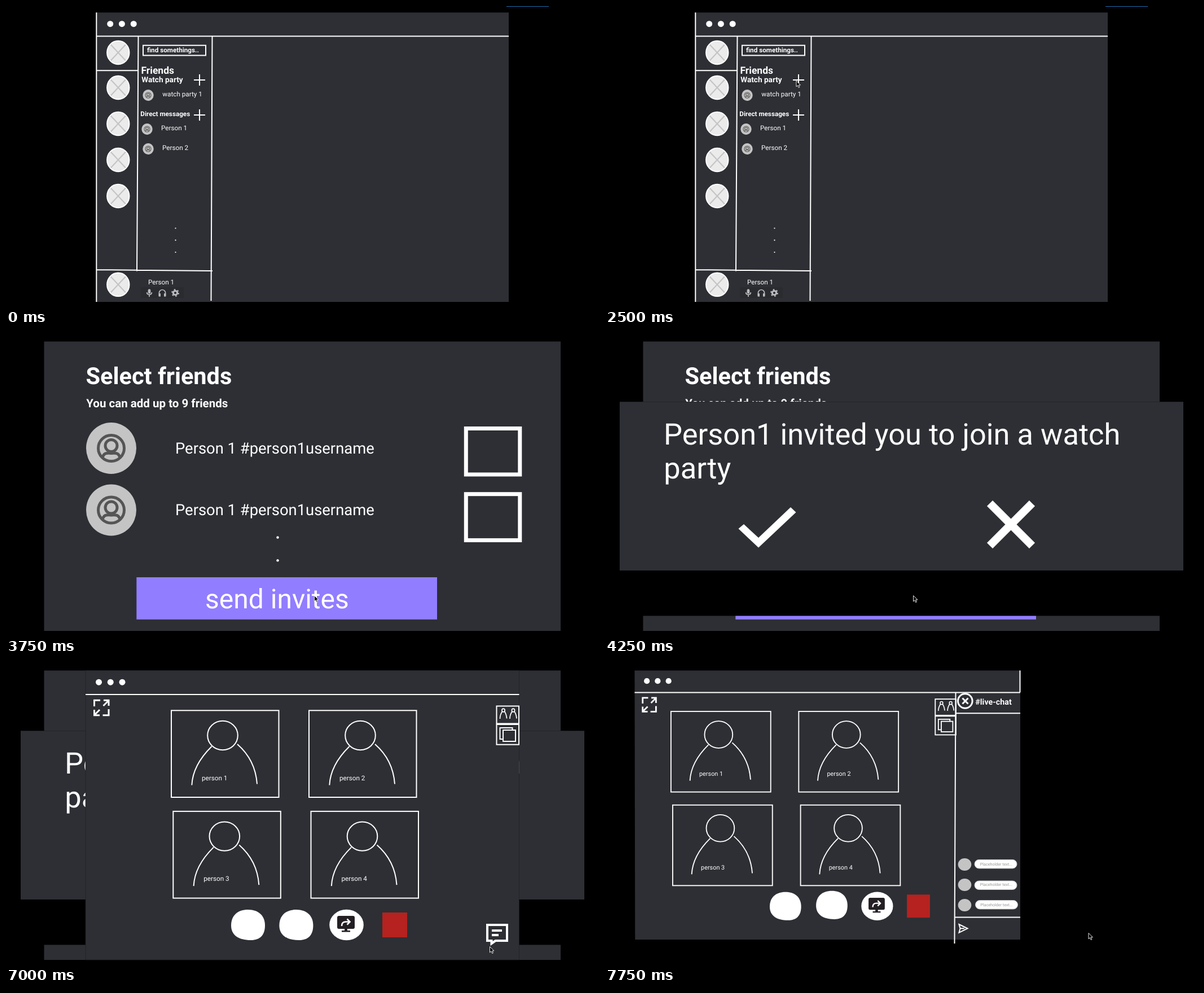
Write an HTML page that moves like this. It is 1051 px wide and 533 px high and loops after 8 s.

```html
<!DOCTYPE html>
<html lang="en">
<head>
<meta charset="utf-8">
<title>Watch party wireframe</title>
<style>
html, body { margin: 0; width: 100%; height: 100%; overflow: hidden; background: #000; }
svg { display: block; width: 1051px; height: 533px; font: 11.7px Roboto, sans-serif; text-rendering: geometricPrecision; }
text { fill: #fff; }
.bold { font-weight: 700; }
.bg { fill: #2d2f34; }
.line { fill: none; stroke: #fff; stroke-width: 2; }
.white { fill: #fff; }
.icon { fill: none; stroke: #fff; stroke-width: 3; }
.grey { fill: #c4c4c4; }
.hint { font-size: 7.2px; fill: #999; }
</style>
</head>
<body>
<svg viewBox="0 0 1051 533">
<defs>
  <g id="avatar">
    <ellipse rx="20" ry="21" fill="#ebebeb"/>
    <path d="M-14-15L14 15M14-15L-14 15" stroke="#c4c4c4" stroke-width="2"/>
    <ellipse rx="19.7" ry="20.7" class="line" stroke-width="1.6"/>
  </g>
  <g id="user">
    <ellipse rx="44.5" ry="45.5" class="grey"/>
    <g fill="none" stroke="#555" stroke-width="5">
      <circle r="23"/>
      <circle cy="-4.5" r="10.5"/>
      <path d="M-16 17C-12 6-6 9 0 9S12 6 16 17"/>
    </g>
  </g>
  <path id="plus" class="line" d="M-10 0H10M0-10V10"/>
  <g id="dots" class="white">
    <circle cx="164.5" cy="32.2" r="5.5"/><circle cx="185.2" cy="32.2" r="5.5"/><circle cx="206" cy="32.2" r="5.5"/>
  </g>
  <g id="card" class="line">
    <rect x="293" y="82.3" width="190.5" height="153.7"/>
    <ellipse cx="384" cy="126.5" rx="26.8" ry="25.7"/>
    <path d="M364.500 146Q331 179 329.300 214.500M410 142Q442 170 445 212.500"/>
  </g>
  <g id="cards">
    <use href="#card"/><use href="#card" x="244"/>
    <use href="#card" x="3.3" y="178.600"/><use href="#card" x="247.500" y="178.600"/>
    <text x="347" y="205.500">person 1</text><text x="591" y="205.500">person 2</text>
    <text x="350.300" y="384">person 3</text><text x="594.500" y="384">person 4</text>
  </g>
  <path id="expand" class="icon" d="M167 64.300H156.500V75M171.500 90.700H182V80M173 64.300H182V74M181.500 65L172.500 74M156.500 81V90.700H166M157 90L166 81"/>
  <g id="panel" class="line">
    <rect x="869.500" y="74.500" width="39.500" height="31"/>
    <rect x="869.500" y="107" width="39.500" height="35.700"/>
    <g id="mini" stroke-width="1.700">
      <ellipse cx="881.500" cy="82" rx="2.600" ry="2.800"/>
      <path d="M879.500 84Q875.500 90 875.500 97M883.500 84Q887 89 887.500 96.500"/>
    </g>
    <use href="#mini" x="17.500"/>
    <rect x="875.500" y="113" width="22" height="20"/>
    <rect x="881" y="117" width="22" height="20" class="bg"/>
  </g>
  <path id="blob" class="white" d="M399 463C399 445 411 435 429 435C448 435 459 446 459 463C459 480 450 489 434 489C412 489 399 480 399 463Z"/>
  <g id="share">
    <ellipse cx="603.500" cy="462" rx="30.300" ry="27.200" class="white"/>
    <path d="M590 446H615Q618 446 618 449V466Q618 469 615 469H605V472H610V474.500H595V472H600V469H590Q587 469 587 466V449Q587 446 590 446Z" fill="#231f23"/>
    <path d="M595 464Q595 456.500 602 456.500H608M604.500 451.500L609.500 456.500L604.500 461.500" fill="none" stroke="#fff" stroke-width="2.600"/>
  </g>
  <rect id="mark" x="667" y="440" width="44" height="44" fill="#b5221f"/>
</defs>

<g id="home">
  <path class="bg" d="M160 11.500H891V524H160Z"/>
  <path class="line" d="M160.300 11.500V524M160 53.500H891M234.500 54L232 469.500M365.500 54L363.500 522M160 114.300H234M160 467L366 469"/>
  <use href="#dots" x="20.200" y="-.500"/>
  <use href="#avatar" x="198.800" y="82.500"/><use href="#avatar" x="198.800" y="144.500"/>
  <use href="#avatar" x="198.800" y="208.500"/><use href="#avatar" x="198.800" y="272.500"/>
  <use href="#avatar" x="198.800" y="336.500"/><use href="#avatar" x="198.800" y="493.300"/>
  <rect class="line" x="243" y="69.700" width="111" height="17.800"/>
  <g class="bold">
    <text x="250" y="82.300">find somethings..</text>
    <text x="239.500" y="119.500" font-size="17.500">Friends</text>
    <text x="240.300" y="134.800" font-size="13.600">Watch party</text>
    <text x="238.300" y="195">Direct messages</text>
  </g>
  <use href="#plus" x="343" y="131"/><use href="#plus" x="343" y="193"/>
  <text x="277.300" y="160">watch party 1</text>
  <text x="275" y="220">Person 1</text>
  <text x="277" y="255">Person 2</text>
  <text x="252" y="493.200">Person 1</text>
  <use href="#user" transform="translate(252 158) scale(.218)"/>
  <use href="#user" transform="translate(250 218) scale(.218)"/>
  <use href="#user" transform="translate(252 253) scale(.218)"/>
  <g class="white"><circle cx="300.500" cy="393.500" r="1.100"/><circle cx="300.500" cy="414.700" r="1.100"/><circle cx="300.500" cy="436" r="1.100"/></g>
  <rect x="239" y="498" width="76" height="19" fill="#292b2f"/>
  <g fill="none" stroke="#b9bbbe" stroke-width="1.700">
    <rect x="252.500" y="502" width="3" height="6.500" rx="1.500" fill="#b9bbbe"/>
    <path d="M249.700 507Q249.700 511 254 511T258.300 507M254 511V515"/>
    <path d="M271.500 513V508A5.500 5.500 0 0 1 282.500 508V513"/>
    <path d="M272.300 509V514.500M281.700 509V514.500" stroke-width="3.400"/>
    <circle cx="300" cy="508" r="3.600" stroke-width="3"/>
    <circle cx="300" cy="508" r="5.800" stroke-width="2.200" stroke-dasharray="2.600 3.474"/>
  </g>
</g>

<g id="select">
  <path class="bg" d="M67.500 11.500H983V524H67.500Z"/>
  <text x="141.500" y="87" font-size="41.500" class="bold">Select friends</text>
  <text x="142.300" y="127.800" font-size="20.500" class="bold">You can add up to 9 friends</text>
  <use href="#user" x="186.500" y="200.500"/><use href="#user" x="186.500" y="310"/>
  <g font-size="27.400">
    <text x="300" y="209.700">Person 1 #person1username</text>
    <text x="300" y="319.200">Person 1 #person1username</text>
  </g>
  <g class="line" stroke-width="7" style="stroke-width:7">
    <rect x="815.300" y="165.500" width="95.500" height="81.500"/><rect x="815.300" y="281.700" width="95.500" height="81.700"/>
  </g>
  <circle cx="481.500" cy="358.500" r="2.200" class="white"/><circle cx="481.500" cy="399.300" r="2.200" class="white"/>
  <rect x="231.300" y="429" width="532.700" height="74.700" fill="#917dff"/>
  <text x="353" y="484" font-size="48">send invites</text>
</g>

<g id="invite">
  <rect x="26" y="118.300" width="999" height="379"/>
  <rect x="26" y="118.300" width="999" height="298.700" class="bg"/>
  <g font-size="52.400">
    <text x="104" y="194">Person1 invited you to join a watch</text>
    <text x="104.300" y="254">party</text>
  </g>
  <path class="white" d="M236.500 343L246 335L272 359L329 305L338.500 314L272 376.500Z"/>
  <path d="M682 298L757 373M757 298L682 373" stroke="#fff" stroke-width="14.200"/>
</g>

<g id="call">
  <path class="bg" d="M141 11.500H909.500V524H141Z" stroke="#1c1d20" stroke-width=".6"/>
  <path class="line" d="M141 54H909.500"/>
  <use href="#dots"/><use href="#expand"/><use href="#cards"/><use href="#panel"/>
  <use href="#blob"/><use href="#blob" x="85.400"/><use href="#share"/><use href="#mark"/>
  <path class="icon" style="stroke-width:4" d="M853 462H888V490H867.500L860.500 495V490H853ZM861 472H879M861 480H873"/>
</g>

<g id="chat">
  <path class="bg" d="M52.500 11.500H736V488H53.300Z"/>
  <path class="line" d="M735.500 11.500V50M52.500 50.400H736M621.500 51L619.500 495M621.500 87.300H736M620 448.500H736"/>
  <g transform="translate(-78.500 .3) scale(.928)"><use href="#dots"/><use href="#expand"/></g>
  <g transform="translate(-155 7.600) scale(.928)"><use href="#cards"/></g>
  <g transform="translate(-221.600 -7) scale(.928)"><use href="#panel"/></g>
  <g transform="translate(-78.300 0) scale(.928)">
    <use href="#blob"/><use href="#blob" x="88.500" y="-2"/><use href="#share" x=".7"/><use href="#mark" x="-6"/>
  </g>
  <circle cx="638.300" cy="65.500" r="12.800" class="icon"/>
  <path class="icon" d="M633.500 60.500L643.500 70.500M643.500 60.500L633.500 70.500"/>
  <text x="656.300" y="72.300" font-size="14.300" class="bold">#live-chat</text>
  <g class="grey"><ellipse cx="637.500" cy="355" rx="11.800" ry="11"/><ellipse cx="637.500" cy="391" rx="11.800" ry="11"/><ellipse cx="637.500" cy="427" rx="11.800" ry="11"/></g>
  <g class="white" stroke="#c4c4c4">
    <rect x="655" y="346.500" width="75" height="15.500" rx="7.700"/><rect x="655" y="384" width="75" height="15.500" rx="7.700"/><rect x="656.500" y="418.500" width="75" height="15.500" rx="7.700"/>
  </g>
  <text x="664.700" y="356.800" class="hint">Placeholder text...</text>
  <text x="664.700" y="393" class="hint">Placeholder text...</text>
  <text x="665.200" y="428.800" class="hint">Placeholder text...</text>
  <path class="line" d="M627.500 461L642.500 468.300L627.500 475.700L629.500 468.300ZM629.500 468.300H637"/>
</g>

<rect id="strip" x="887" y="0" width="75" height="1" fill="#1c70b8"/>
<path id="cursor" d="M.5.5V10.800L2.900 8.600L4.700 12.500L6.400 11.700L4.700 7.900H8Z" fill="#000" stroke="#fff" stroke-width=".9"/>
</svg>
<script>
const LOOP = 8000;
// Visible spans: id, start, end
const spans = [
  ["home", 0, 2750], ["select", 2750, 7500], ["invite", 4250, 7500],
  ["call", 5500, 7750], ["chat", 7750, LOOP], ["strip", 0, 3000], ["cursor", 250, LOOP]
];
// Pointer stops: time, x, y
const stops = [
  [250, 478, 61], [500, 472, 64], [1000, 409, 103], [1250, 336, 114], [1500, 338, 131],
  [1750, 338, 137], [2250, 338, 134], [2500, 338.5, 132], [3000, 355, 148], [3250, 567, 443],
  [3500, 562, 483], [3750, 546, 461], [5000, 274.5, 343], [6750, 693, 441], [7000, 857, 500],
  [7250, 856.5, 476]
];
const el = id => document.getElementById(id);

function draw(t) {
  for (const [id, from, to] of spans) el(id).style.display = t >= from && t < to ? "" : "none";
  el("strip").setAttribute("opacity", t < 2750 ? 1 : 0.5);
  const [, x, y] = stops.findLast(s => s[0] <= t) || stops[0];
  el("cursor").setAttribute("transform", `translate(${x} ${y})`);
}

const start = performance.now();
function tick() {
  draw((performance.now() - start) % LOOP);
  requestAnimationFrame(tick);
}
tick();
</script>
</body>
</html>
```
